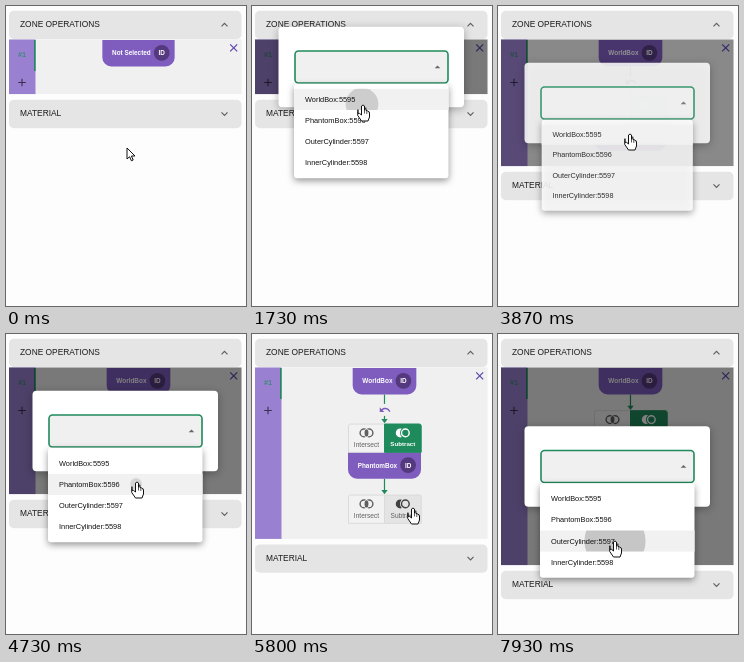
An HTML page with a canvas that plays this animation: 240 by 300 pixels, repeating every 8 s.

```html
<!DOCTYPE html>
<html lang="en">
<head>
<meta charset="utf-8">
<title>Zone operations</title>
<style>
  html, body { margin: 0; width: 100%; height: 100%; overflow: hidden; background: #fdfdfd; }
  canvas { display: block; width: 240px; height: 300px; }
</style>
</head>
<body>
<canvas id="stage"></canvas>
<script>
const W = 240, H = 300, LOOP = 8000;
const canvas = document.getElementById('stage');
const ctx = canvas.getContext('2d');
const dpr = Math.max(1, window.devicePixelRatio || 1);
canvas.width = W * dpr;
canvas.height = H * dpr;

const FONT = '"Liberation Sans", Arial, sans-serif';
const GREEN = '#1f8b5c', PURPLE = '#7e5dbf', PANEL = '#f0f0f0';
const TOP = 34, CHIP_H = 26.4, OP_H = 28.8, GAP = 15.8, UNDO_GAP = 29.1, MID = 132.5;
const ROW_H = 21.1;
const ITEMS = ['WorldBox:5595', 'PhantomBox:5596', 'OuterCylinder:5597', 'InnerCylinder:5598'];

// start time, chip labels, whether an operation is still to be chosen
const STATES = [
  [0, ['Not Selected'], false],
  [1800, ['WorldBox'], true],
  [2955, ['WorldBox', 'Not Selected'], false],
  [4880, ['WorldBox', 'PhantomBox'], true],
  [5995, ['WorldBox', 'PhantomBox', 'Not Selected'], false]
];
const DIALOGS = [[600, 1800], [3740, 4880], [6867, 9999]];
const RIPPLES = [[1606, 110, 98], [4648, 130, 150], [7770, 117, 207]];
const MOVES = [
  [70, 121, 142], [500, 122, 52], [1270, 122, 52], [1500, 111, 99],
  [2130, 111, 99], [2450, 130, 121], [2800, 149, 91.5], [3130, 149, 91.5],
  [3600, 132, 128], [3870, 132, 128], [4200, 132, 166], [4400, 132, 166],
  [4530, 131, 148], [5200, 131, 148], [5730, 161, 174], [6130, 161, 174],
  [6600, 129.5, 211], [6950, 129.5, 211], [7200, 122, 234], [7470, 122, 234],
  [7690, 117, 207]
];

const UNDO = new Path2D('M12.5 8c-2.65 0-5.05.99-6.9 2.6L2 7v9h9l-3.62-3.62c1.39-1.16 3.16-1.88 5.12-1.88 3.54 0 6.55 2.31 7.6 5.5l2.37-.78C21.08 11.03 17.15 8 12.5 8z');
const ARROW = new Path2D('M0 0V11L2.6 8.7 4.4 12.8 6.2 12 4.4 8H8Z');
const HAND = new Path2D('M-1.5 1Q0-1 1.5 1V5.4Q3-.0 3 5.6Q4.6 5 5 6.6Q6.4 6.2 6.5 8V12L5 16H-1.5L-5.3 10.4Q-5-.0 -5 8.4Q-3.6 7.6-1.5 10Z');

const clamp = v => Math.min(1, Math.max(0, v));

// cubic-bezier(.4, 0, .2, 1)
function ease(x) {
  x = clamp(x);
  let lo = 0, hi = 1;
  for (let i = 0; i < 18; i++) {
    const u = (lo + hi) / 2, v = 1 - u;
    if (1.2 * u * v * v + 0.6 * u * u * v + u * u * u < x) lo = u; else hi = u;
  }
  return lo * lo * (3 - 2 * lo);
}

function box(x, y, w, h, r, fill, stroke, lw = 1) {
  ctx.beginPath();
  ctx.roundRect(x, y, w, h, r);
  if (fill) { ctx.fillStyle = fill; ctx.fill(); }
  if (stroke) { ctx.strokeStyle = stroke; ctx.lineWidth = lw; ctx.stroke(); }
}

function disc(x, y, r, fill) {
  ctx.beginPath();
  ctx.arc(x, y, r, 0, 7);
  ctx.fillStyle = fill;
  ctx.fill();
}

function ring(x, y, r, color, lw) {
  ctx.beginPath();
  ctx.arc(x, y, r, 0, 7);
  ctx.strokeStyle = color;
  ctx.lineWidth = lw;
  ctx.stroke();
}

function line(color, lw, ...pts) {
  ctx.beginPath();
  for (let i = 0; i < pts.length; i += 2) ctx.lineTo(pts[i], pts[i + 1]);
  ctx.strokeStyle = color;
  ctx.lineWidth = lw;
  ctx.stroke();
}

function tri(color, x, y, w, h) {
  ctx.beginPath();
  ctx.moveTo(x - w, y);
  ctx.lineTo(x + w, y);
  ctx.lineTo(x, y + h);
  ctx.fillStyle = color;
  ctx.fill();
}

function text(s, x, y, size, color, align = 'left', weight = 400) {
  ctx.font = `${weight} ${size}px ${FONT}`;
  ctx.textAlign = align;
  ctx.textBaseline = 'alphabetic';
  ctx.fillStyle = color;
  ctx.fillText(s, x, y + size * 0.36);
}

function shadow(blur, dy, alpha, draw) {
  ctx.save();
  ctx.shadowColor = `rgba(0,0,0,${alpha})`;
  ctx.shadowBlur = blur * dpr;
  ctx.shadowOffsetY = dy * dpr;
  draw();
  ctx.restore();
}

function layout(t) {
  const [since, names, pending] = STATES.filter(s => s[0] <= t).pop();
  const chips = [{ y: TOP, name: names[0] }], ops = [];
  let y = TOP + CHIP_H;
  for (let i = 1; i < names.length + (pending ? 1 : 0); i++) {
    const undo = i === names.length - 1;
    const from = y;
    y += undo ? UNDO_GAP : GAP;
    ops.push({ from, y, undo, active: i < names.length, fresh: undo && !pending });
    y += OP_H;
    if (i < names.length) {
      chips.push({ y, name: names[i] });
      y += CHIP_H;
    }
  }
  const bottom = Math.max(88.3, y + 15.6);
  return { since, chips, ops, bottom, center: (bottom + 5.5 + 28.2) / 2 };
}

function dialogAt(t) {
  for (const [open, close] of DIALOGS) {
    if (t >= open && t < close) {
      return { p: ease((t - open) / 225), grow: ease((t - open) / 200), open: true };
    }
    if (t >= close && t < close + 195) {
      return { p: 1 - ease((t - close) / 195), grow: 1, open: false };
    }
  }
  return null;
}

function pointerAt(t) {
  const i = MOVES.findIndex(m => m[0] > t);
  if (i === 0) return { x: MOVES[0][1], y: MOVES[0][2] };
  const a = MOVES[(i < 0 ? MOVES.length : i) - 1];
  const b = i < 0 ? a : MOVES[i];
  const u = clamp((t - a[0]) / (b[0] - a[0] || 1));
  const k = u * u * (3 - 2 * u);
  return { x: a[1] + (b[1] - a[1]) * k, y: a[2] + (b[2] - a[2]) * k };
}

const inside = (p, x, y, w, h) => p.x >= x && p.x < x + w && p.y >= y && p.y < y + h;

function header(label, y, up) {
  box(3, y, 232.5, 28.4, 5, '#e5e5e5');
  text(label, 14, y + 13.2, 8.4, '#1c1c1c');
  const d = up ? -1.5 : 1.5, c = y + 14;
  line('#606060', 1.2, 215.5, c - d, 218.5, c + d, 221.5, c - d);
}

function joinIcon(cx, cy, color, bg, subtract) {
  ctx.save();
  ctx.translate(cx, cy);
  ctx.scale(0.64, 0.64);
  if (subtract) {
    disc(-4, 0, 7, color);
    disc(4, 0, 8.4, bg);
    ring(4, 0, 6, color, 2.2);
  } else {
    ring(4, 0, 6, color, 2.2);
    ring(-4, 0, 6, color, 2.2);
    ctx.beginPath();
    ctx.ellipse(0, 0, 4.2, 6.6, 0, 0, 7);
    ctx.fillStyle = bg;
    ctx.fill();
    ctx.beginPath();
    ctx.ellipse(0, 0, 3, 5.74, 0, 0, 7);
    ctx.fillStyle = color;
    ctx.fill();
  }
  ctx.restore();
}

function drawLink(op) {
  line(GREEN, 1.2, MID, op.from, MID, op.y - 3);
  if (op.undo) {
    const cy = op.from + 15.5;
    ctx.fillStyle = PANEL;
    ctx.fillRect(MID - 7, cy - 6, 14, 12);
    ctx.save();
    ctx.translate(MID - 5.8, cy - 6.2);
    ctx.scale(0.52, 0.52);
    ctx.fillStyle = PURPLE;
    ctx.fill(UNDO);
    ctx.restore();
  }
  tri(GREEN, MID, op.y - 4.4, 3.2, 4.2);
}

function mix(a, b, k) {
  return `rgb(${a.map((v, i) => Math.round(v + (b[i] - v) * k))})`;
}

function drawOp(op, t, since, ptr) {
  const { y, active } = op;
  const hoverL = ptr && inside(ptr, 96, y, 36.5, OP_H);
  const hoverR = ptr && inside(ptr, MID, y, 37, OP_H);
  const bgL = hoverL && !active ? '#e4e4e4' : '#f2f2f2';
  const k = op.fresh ? ease((t - since) / 250) : 1;
  const bgR = active ? mix([230, 234, 232], [31, 139, 92], k) : hoverR ? '#e4e4e4' : '#f0f0f0';
  box(96.5, y + 0.5, 36, OP_H - 0.5, [2, 0, 0, 0], bgL, '#dadada');
  box(132.5, y + 0.5, 36.7, OP_H - 0.5, [0, 2, 0, 0], bgR, active ? bgR : '#dadada');
  joinIcon(114.5, y + 9.4, '#606060', bgL, false);
  text('Intersect', 114.5, y + 20.7, 6.6, '#606060', 'center');
  joinIcon(150.8, y + 9.4, active ? '#fff' : hoverR ? '#404040' : '#606060', bgR, true);
  if (active) text('Subtract', 150.8, y + 20.7, 6.15, '#fff', 'center', 700);
  else text('Subtract', 150.8, y + 20.7, 6.6, '#606060', 'center');
}

function drawChip({ y, name }) {
  const size = 6.4;
  ctx.font = `700 ${size}px ${FONT}`;
  const w = ctx.measureText(name).width + 33.6;
  const x = MID - w / 2, idX = x + w - 12.9;
  box(x, y, w, CHIP_H, [0, 0, 9, 9], PURPLE);
  text(name, x + 9.7, y + 13, size, '#fff', 'left', 700);
  disc(idX, y + 12.8, 7.9, '#55397f');
  text('ID', idX, y + 13, 6.4, '#fff', 'center', 700);
}

function drawPanel(t, view, ptr, dim) {
  const h = view.bottom - TOP;
  ctx.save();
  ctx.beginPath();
  ctx.rect(3, 33.4, 232.5, h + 0.6);
  ctx.clip();
  ctx.fillStyle = PANEL;
  ctx.fillRect(3, 33, 233, h + 1);
  ctx.fillStyle = '#9a80d0';
  ctx.fillRect(3, 33, 26.5, h + 1);
  ctx.fillStyle = GREEN;
  ctx.fillRect(28, 34, 1.6, 31);
  text('#1', 16, 48.3, 7.4, GREEN, 'center');
  line('#3a3150', 1.1, 12.2, 76.5, 19.8, 76.5);
  line('#3a3150', 1.1, 16, 72.7, 16, 80.3);
  line('#5f45ad', 1.2, 224.2, 38.4, 231.2, 45.4);
  line('#5f45ad', 1.2, 231.2, 38.4, 224.2, 45.4);
  view.ops.forEach(drawLink);
  view.chips.forEach(drawChip);
  view.ops.forEach(op => drawOp(op, t, view.since, ptr));
  if (dim) {
    ctx.fillStyle = `rgba(0,0,0,${0.5 * dim})`;
    ctx.fillRect(3, 33, 233, h + 1);
  }
  ctx.restore();
}

function drawMenu(t, top, dlg, row) {
  const h = ROW_H * 4 + 10;
  const g = dlg.grow;
  ctx.save();
  ctx.globalAlpha = dlg.p;
  ctx.translate(119, top);
  ctx.scale(0.75 + 0.25 * g, 0.5625 + 0.4375 * g);
  ctx.translate(-119, -top);
  shadow(7, 2.5, 0.42, () => box(42, top, 154.5, h, 3, '#fff'));
  ITEMS.forEach((label, i) => {
    const y = top + 5 + i * ROW_H;
    if (i === row) {
      ctx.fillStyle = '#f1f1f1';
      ctx.fillRect(42, y, 154.5, ROW_H);
      const rip = RIPPLES.find(r => t >= r[0] && t < r[0] + 550);
      if (rip) {
        const dt = t - rip[0];
        ctx.save();
        ctx.beginPath();
        ctx.rect(42, y, 154.5, ROW_H);
        ctx.clip();
        disc(rip[1], rip[2], 88 * ease(dt / 550), `rgba(0,0,0,${Math.min(0.18, 0.05 + dt * 0.0008)})`);
        ctx.restore();
      }
    }
    text(label, 53, y + 10.4, 7.38, '#111');
  });
  ctx.restore();
}

function drawDialog(t, view, dlg, row) {
  const c = view.center;
  ctx.save();
  ctx.globalAlpha = dlg.p;
  shadow(8, 2, 0.3, () => box(26.5, c - 40.3, 185.5, 80.6, 4, '#fff'));
  box(43, c - 16, 153, 32, 3.5, '#f0f0f0', GREEN, 1.6);
  tri('#666', 185.5, c + 1.3, 2.8, -2.8);
  ctx.restore();
  drawMenu(t, c + 16.8, dlg, row);
}

function drawPointer(p, hand) {
  ctx.save();
  ctx.translate(p.x, p.y);
  const shape = hand ? HAND : ARROW;
  ctx.lineJoin = 'round';
  ctx.fillStyle = '#fff';
  ctx.fill(shape);
  ctx.strokeStyle = '#111';
  ctx.lineWidth = 1;
  ctx.stroke(shape);
  if (hand) {
    line('#111', 0.7, 1.5, 5.4, 1.5, 8.5);
    line('#111', 0.7, 3.8, 6, 3.8, 9);
  }
  ctx.restore();
}

function render(t) {
  const view = layout(t), dlg = dialogAt(t), ptr = pointerAt(t);
  const free = !dlg || !dlg.open;
  let row = -1;
  if (dlg && dlg.p > 0.5) {
    const top = view.center + 21.8;
    if (inside(ptr, 42, top, 154.5, ROW_H * 4)) row = Math.floor((ptr.y - top) / ROW_H);
  }
  const onButton = free && (
    view.chips.some(c => inside(ptr, 96, c.y, 73, CHIP_H)) ||
    view.ops.some(o => inside(ptr, 96, o.y, 73, OP_H)));

  ctx.setTransform(dpr, 0, 0, dpr, 0, 0);
  ctx.fillStyle = '#fdfdfd';
  ctx.fillRect(0, 0, W, H);
  header('ZONE OPERATIONS', 4.8, true);
  drawPanel(t, view, free ? ptr : null, dlg ? dlg.p : 0);
  header('MATERIAL', view.bottom + 5.5, false);
  if (dlg) drawDialog(t, view, dlg, row);
  drawPointer(ptr, onButton || row >= 0);
}

const start = performance.now();
function tick() {
  render((performance.now() - start) % LOOP);
  requestAnimationFrame(tick);
}
tick();
</script>
</body>
</html>
```
